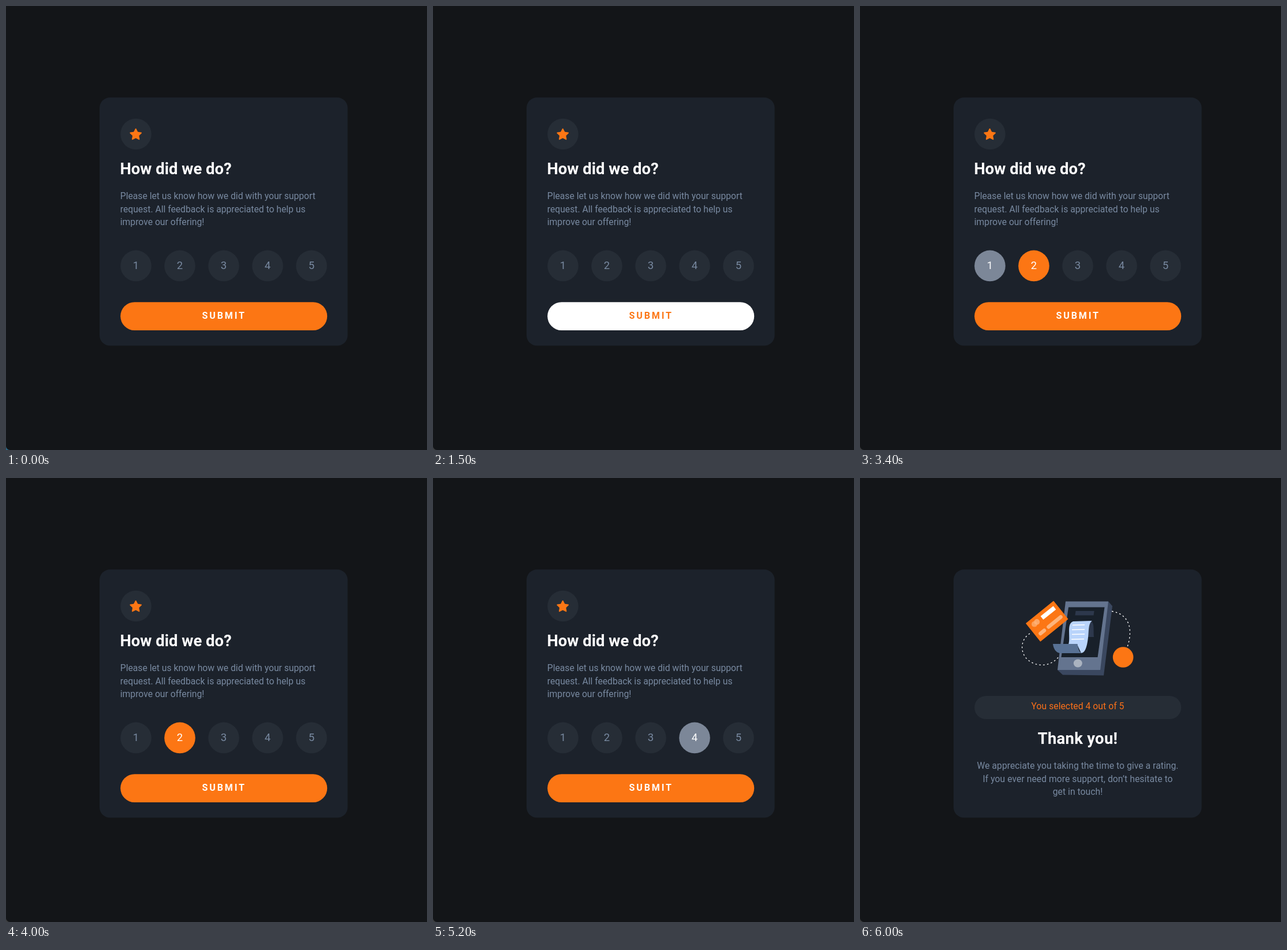
An HTML page that plays this animation: 729x768 px, repeating every 8 s.

```html
<!DOCTYPE html>
<html lang="en">
<head>
<meta charset="utf-8">
<title>Rating card</title>
<style>
  html, body { margin: 0; height: 100%; overflow: hidden; background: #131518; }
  svg { display: block; width: 100vw; height: 100vh; }
  text { font: 15.7px Roboto, sans-serif; fill: #7889a0; }
  .title { font-size: 27.4px; font-weight: 700; fill: #fff; }
  .rating circle { fill: #262d36; }
  .rating text { font-size: 18.5px; text-anchor: middle; }
  .rating.chosen circle { fill: #7c8798; }
  .rating.hover circle { fill: #fc7614; }
  .rating.chosen text, .rating.hover text { fill: #fff; }
  .submit rect { fill: #fc7614; }
  .submit text { font-size: 16px; font-weight: 700; letter-spacing: 2.9px; fill: #fff; }
  .submit.hover rect { fill: #fff; }
  .submit.hover text { fill: #fc7614; }
  #thanks text { text-anchor: middle; letter-spacing: .05px; }
  #thanks .title { letter-spacing: .3px; }
  #thanks .choice { fill: #fb7019; }
  .dots { fill: none; stroke: #fff; stroke-width: 1.3; stroke-dasharray: 2.6 4.2; }
  .pale { stroke: #fdb47c; stroke-width: 6.5; stroke-linecap: round; }
</style>
</head>
<body>
<svg viewBox="0 0 729 768">
  <path id="corner" d="M0 761A7 7 0 0 0 7 768H0Z"/>
  <rect x="162" y="158.3" width="429.6" height="429.2" rx="18" fill="#1c222b"/>

  <g id="survey">
    <circle cx="225" cy="221.5" r="26.8" fill="#262d36"/>
    <path transform="translate(214.4 211.8) scale(1.23)" fill="#fc7614" d="m9.067.43 1.99 4.031c.112.228.33.386.58.422l4.45.647a.772.772 0 0 1 .427 1.316l-3.22 3.138a.773.773 0 0 0-.222.683l.76 4.431a.772.772 0 0 1-1.12.813l-3.98-2.092a.773.773 0 0 0-.718 0l-3.98 2.092a.772.772 0 0 1-1.119-.813l.76-4.431a.77.77 0 0 0-.222-.683L.233 6.846A.772.772 0 0 1 .661 5.53l4.449-.647a.772.772 0 0 0 .58-.422L7.68.43a.774.774 0 0 1 1.387 0Z"/>
    <text class="title" x="197.5" y="291">How did we do?</text>
    <text x="197.8" y="334">Please let us know how we did with your support</text>
    <text x="197.8" y="356.5">request. All feedback is appreciated to help us</text>
    <text x="197.8" y="379">improve our offering!</text>
    <g id="ratings"></g>
    <g class="submit">
      <rect x="198.2" y="512.2" width="358" height="48.8" rx="24.4"/>
      <text x="339.5" y="540.5">SUBMIT</text>
    </g>
  </g>

  <g id="thanks">
    <path class="dots" d="M294 269C277 280 277 302 290 314C306 328 331 327 345 308"/>
    <path class="dots" d="M436 230.5C467 236 473 262 463 292"/>
    <circle cx="455.6" cy="310" r="17.8" fill="#fc7614"/>
    <!-- phone -->
    <path d="M430 213.5L437 221.5L422 341.5L351 340.5L342 332Z" fill="#3a475f"/>
    <path d="M356 213.5H430L416 332H342Z" fill="#64748f"/>
    <path d="M361 223.5H423.5L411.5 310H348.5Z" fill="#18202a"/>
    <path d="M373.5 230H405.5L404.5 237.5H372.5Z" fill="#2d384c"/>
    <path d="M394 248H400C406 250 404 262 405 275H390Z" fill="#2d384c"/>
    <ellipse cx="377.3" cy="320.5" rx="7.5" ry="7" fill="#aab3c0"/>
    <!-- receipt -->
    <path d="M369 248L402 247C394 252 397 268 394 283C392 295 389 302 383 303L376 288H361C365 275 357 252 369 248Z" fill="#b9d4fb"/>
    <path d="M334 287H376.5C378 295 379 301 384 303H346C339 302 335 295 334 287Z" fill="#587194"/>
    <path d="M368 254.5L389 254M367 262.5L389 262M367 270.5L389 270M366 279L388 278.5" stroke="#fff" stroke-width="1.6"/>
    <!-- payment card -->
    <path d="M288 251.5L335 213.5L359.5 244L312.5 282Z" fill="#fc7614" stroke="#fc7614" stroke-width="1.5" stroke-linejoin="round"/>
    <path d="M315 242L337 224.5" stroke="#fff" stroke-width="7.5"/>
    <circle cx="302" cy="252.7" r="4.9" fill="#fda25c"/>
    <circle cx="306.3" cy="249" r="4.9" fill="#fdb47c" fill-opacity=".8"/>
    <path class="pale" d="M312.5 269L319 263.8M326.5 257.5L347.5 240.5"/>

    <rect x="198.2" y="377" width="358" height="40" rx="20" fill="#262d36"/>
    <text class="choice" x="377" y="400.3">You selected 4 out of 5</text>
    <text class="title" x="377" y="459.5">Thank you!</text>
    <text x="377" y="503.2">We appreciate you taking the time to give a rating.</text>
    <text x="377" y="525.8">If you ever need more support, don’t hesitate to</text>
    <text x="377" y="548.2">get in touch!</text>
  </g>
</svg>
<script>
const LOOP = 8000, THANKS_AT = 6000, CORNER_AT = 1200, SUBMIT = 6;

// [start ms, hovered control, chosen rating]
const steps = [
  [0, 0, 0], [500, 2, 0], [600, 1, 0], [900, 0, 0],
  [1400, 1, 0], [1500, SUBMIT, 0], [2400, 0, 0],
  [2800, 1, 0], [3300, 0, 1], [3400, 2, 1],
  [4000, 2, 2], [4100, 3, 2], [4400, 3, 3], [4500, 0, 3],
  [4600, 4, 3], [5200, 0, 4], [5600, SUBMIT, 4]
];

const byId = id => document.getElementById(id);

byId('ratings').innerHTML = [1, 2, 3, 4, 5].map(n => {
  const x = 149 + 76 * n;
  return `<g class="rating"><circle cx="${x}" cy="449.4" r="26.8"/><text x="${x}" y="454.7">${n}</text></g>`;
}).join('');

const ratings = [...document.querySelectorAll('.rating')];
const submit = document.querySelector('.submit');
const show = (id, visible) => byId(id).style.display = visible ? '' : 'none';

function draw(now) {
  const time = now % LOOP;
  const [, hovered, chosen] = steps.findLast(step => step[0] <= time);
  ratings.forEach((rating, i) => {
    rating.classList.toggle('hover', hovered === i + 1);
    rating.classList.toggle('chosen', chosen === i + 1);
  });
  submit.classList.toggle('hover', hovered === SUBMIT);
  show('survey', time < THANKS_AT);
  show('thanks', time >= THANKS_AT);
  byId('corner').style.fill = time < CORNER_AT ? '#2b6685' : '#3c3e41';
}

const start = performance.now();
function tick() {
  draw(performance.now() - start);
  requestAnimationFrame(tick);
}
tick();
</script>
</body>
</html>
```
